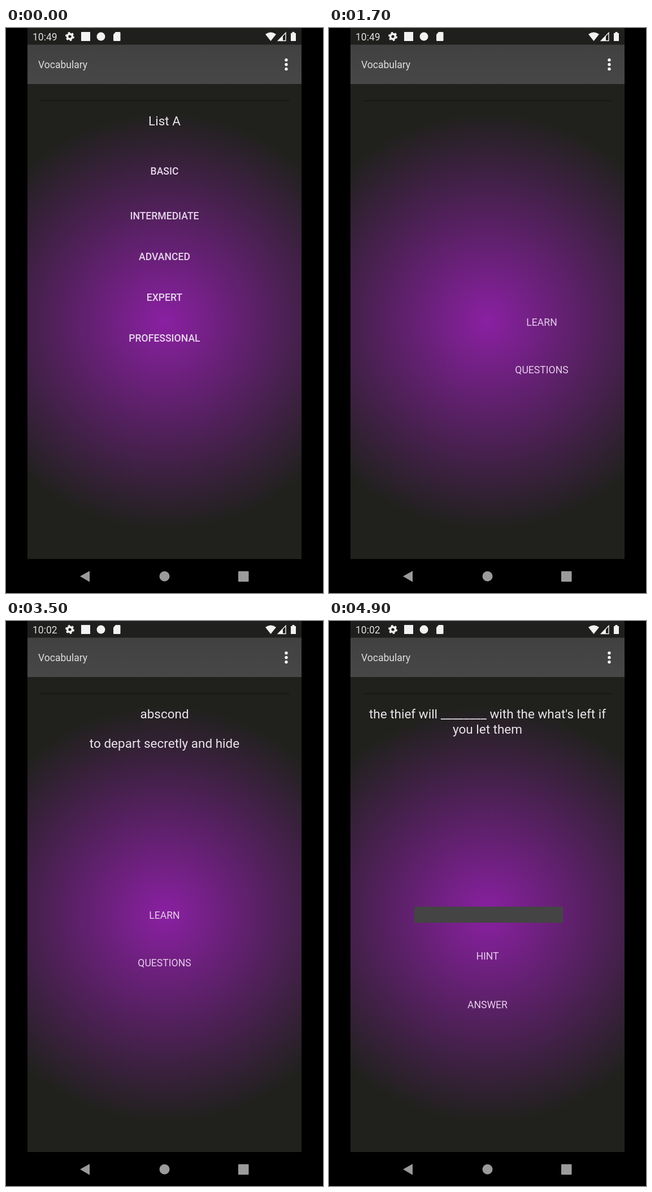
Animation of 561 by 998 pixels, one loop 5 s. Source, as an HTML page:

```html
<!DOCTYPE html>
<html lang="en">
<head>
<meta charset="utf-8">
<title>Vocabulary</title>
<style>
html, body { margin: 0; height: 100%; overflow: hidden; background: #000; }
svg { display: block; width: 561px; height: 998px; font-family: Roboto, sans-serif; }
.bar { font-size: 17.5px; fill: #dedede; }
.big { font-size: 22.5px; fill: #e9e4ea; text-anchor: middle; }
.btn { font-size: 17.6px; fill: #e6cdea; text-anchor: middle; }
.list .btn { font-weight: 500; fill: #e6d6ea; }

/* hard cuts */
.cut { visibility: hidden; animation: 5s step-end infinite; }
.clock1 { animation-name: clock1; }
.clock2 { animation-name: clock2; }
.list { animation-name: list; }
.learn { animation-name: learn; }
.w1 { animation-name: w1; }
.w2 { animation-name: w2; }
.w3 { animation-name: w3; }
.w4 { animation-name: w4; }
.w5 { animation-name: w5; }
@keyframes clock1 { 0% { visibility: visible } 47.8%, 100% { visibility: hidden } }
@keyframes clock2 { 0% { visibility: hidden } 47.8%, 100% { visibility: visible } }
@keyframes list { 0% { visibility: visible } 23.8%, 100% { visibility: hidden } }
@keyframes learn { 0% { visibility: hidden } 25.8% { visibility: visible } 83.8%, 100% { visibility: hidden } }
@keyframes w1 { 0% { visibility: hidden } 47.8% { visibility: visible } 53.8%, 100% { visibility: hidden } }
@keyframes w2 { 0% { visibility: hidden } 53.8% { visibility: visible } 59.8%, 100% { visibility: hidden } }
@keyframes w3 { 0% { visibility: hidden } 59.8% { visibility: visible } 65.8%, 100% { visibility: hidden } }
@keyframes w4 { 0% { visibility: hidden } 65.8% { visibility: visible } 73.8%, 100% { visibility: hidden } }
@keyframes w5 { 0% { visibility: hidden } 73.8% { visibility: visible } 83.8%, 100% { visibility: hidden } }

/* screens entering from the right */
.slide { animation: 5s linear infinite; }
.inLearn { animation-name: inLearn; }
.inQuiz { animation-name: inQuiz; }
@keyframes inLearn { 0%, 26% { transform: translateX(485px) } 36%, 100% { transform: none } }
@keyframes inQuiz { 0%, 86% { transform: translateX(485px) } 96%, 100% { transform: none } }
</style>
</head>
<body>
<svg viewBox="0 0 561 998">
  <defs>
    <radialGradient id="glow" gradientUnits="userSpaceOnUse" cx="281" cy="518" r="367">
      <stop offset="0" stop-color="#8a20a2"/>
      <stop offset="1" stop-color="#20211d"/>
    </radialGradient>
    <linearGradient id="head" x2="0" y2="1">
      <stop offset="0" stop-color="#414141"/>
      <stop offset="1" stop-color="#474747"/>
    </linearGradient>
    <clipPath id="screen"><rect x="38" y="99" width="485" height="839"/></clipPath>
  </defs>

  <rect width="561" height="998"/>
  <rect x="38" width="485" height="30" fill="#1f201e"/>
  <rect x="38" y="29.5" width="485" height="69.5" fill="url(#head)"/>
  <rect x="38" y="99" width="485" height="839" fill="url(#glow)"/>
  <rect x="60" y="127" width="442" height="2.5" fill="#191a17"/>

  <!-- status bar -->
  <text class="bar cut clock1" x="47" y="21.5">10:49</text>
  <text class="bar cut clock2" x="47" y="21.5">10:02</text>
  <g fill="#f2f2f2">
    <g fill="none" stroke="#f2f2f2">
      <circle cx="113" cy="15" r="4.4" stroke-width="3.6"/>
      <circle cx="113" cy="15" r="6.8" stroke-width="2.4" stroke-dasharray="3.56"/>
    </g>
    <rect x="133" y="7" width="16" height="16"/>
    <circle cx="168" cy="15" r="7.5"/>
    <path d="M194 7h7q1.500 0 1.500 1.500v13q0 1.500-1.500 1.500h-9.500q-1.500 0-1.500-1.500V11.500z"/>
    <path d="M459 11Q468.500 4 478 11L468.500 23z"/>
    <path d="M481.500 22.500L495 8.500V22.500z" fill="none" stroke="#f2f2f2" stroke-width="1.400"/>
    <path d="M481 22.500L490 13V22.500z"/>
    <path d="M504 9h2.500V7h4v2h2.500v14h-9z"/>
  </g>

  <!-- toolbar -->
  <text class="bar" x="57" y="71">Vocabulary</text>
  <g fill="#f4f4f4">
    <circle cx="496" cy="56.500" r="2.700"/>
    <circle cx="496" cy="64.500" r="2.700"/>
    <circle cx="496" cy="72.500" r="2.700"/>
  </g>

  <g clip-path="url(#screen)">
    <g class="cut list">
      <text class="big" x="280.5" y="172">List A</text>
      <text class="btn" x="280.5" y="259">BASIC</text>
      <text class="btn" x="280.5" y="338">INTERMEDIATE</text>
      <text class="btn" x="280.5" y="410">ADVANCED</text>
      <text class="btn" x="280.5" y="482">EXPERT</text>
      <text class="btn" x="280.5" y="554">PROFESSIONAL</text>
    </g>

    <g class="cut learn">
      <g class="slide inLearn">
        <text class="btn" x="280.5" y="526">LEARN</text>
        <text class="btn" x="280.5" y="610">QUESTIONS</text>
      </g>
    </g>

    <g class="cut w1">
      <text class="big" x="280.5" y="172">abject</text>
      <text class="big" x="280.5" y="224">sunk to or exsisting in a low state or</text>
      <text class="big" x="280.5" y="250.500">condition</text>
    </g>
    <g class="cut w2">
      <text class="big" x="280.5" y="172">abjure</text>
      <text class="big" x="280.5" y="224">to renounce upon oath or reject formally</text>
    </g>
    <g class="cut w3">
      <text class="big" x="280.5" y="172">abnegate</text>
      <text class="big" x="280.5" y="224">surrender, relinquish, deny,</text>
      <text class="big" x="280.5" y="250.500">renounce(self-denial)</text>
    </g>
    <g class="cut w4">
      <text class="big" x="280.5" y="172">abscond</text>
      <text class="big" x="280.5" y="224">to depart secretly and hide</text>
    </g>
    <g class="cut w5">
      <text class="big" x="280.5" y="172">abstruse</text>
      <text class="big" x="280.5" y="224">hard to understand, very obscure</text>
    </g>

    <g class="slide inQuiz">
      <text class="big" x="280.5" y="172">the thief will ________ with the what's left if</text>
      <text class="big" x="280.5" y="198.500">you let them</text>
      <rect x="151" y="504.500" width="263" height="28.500" fill="#444"/>
      <text class="btn" x="280.5" y="598">HINT</text>
      <text class="btn" x="280.5" y="684">ANSWER</text>
    </g>
  </g>

  <!-- navigation -->
  <g fill="#9b9b9b">
    <path d="M131 968.500L148 959V978.500z"/>
    <circle cx="280.500" cy="968.500" r="9"/>
    <rect x="411" y="959.500" width="18.500" height="18.500" rx="1"/>
  </g>
</svg>
</body>
</html>
```
